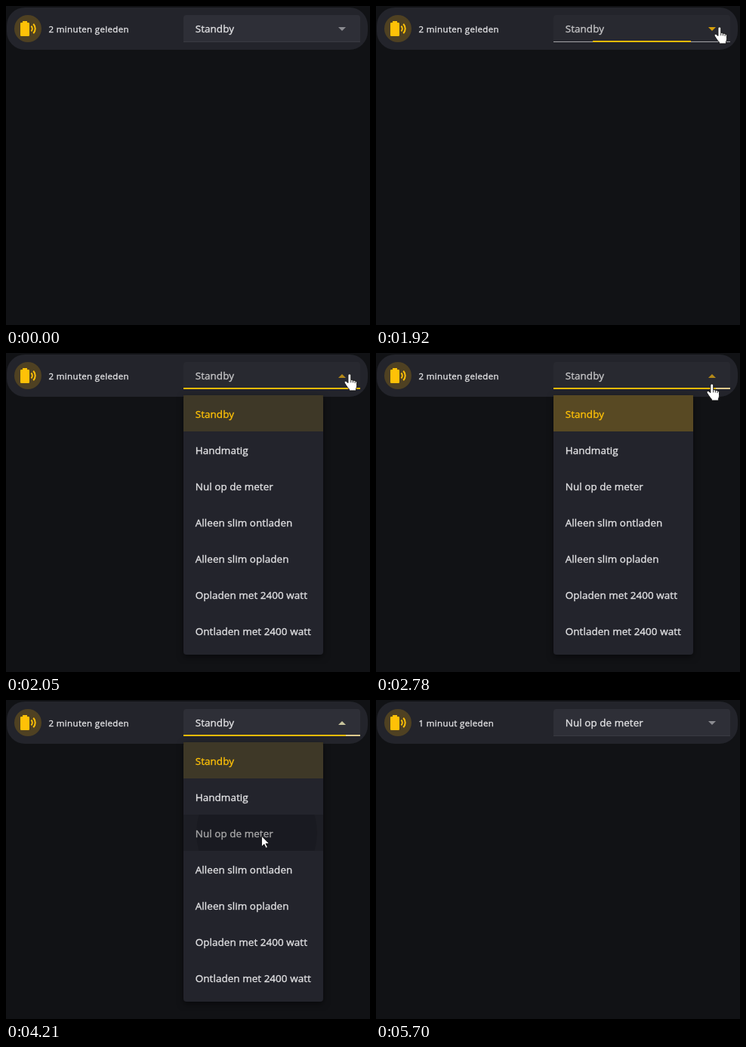
Recreate the animation shown at these times as an HTML page. Size 482 by 423 pixels, loop 9170 ms.

```html
<!DOCTYPE html>
<html lang="nl">
<head>
<meta charset="utf-8">
<title>Batterijmodus</title>
<style>
html, body { margin: 0; width: 100%; height: 100%; overflow: hidden; background: #111215; }
svg { display: block; }
text {
  font: 500 13.4px "Open Sans", "Noto Sans", sans-serif; letter-spacing: .08px;
  color: #e3e3e5; fill: currentColor; stroke: currentColor; stroke-width: .35;
}
#ago { font-size: 11.5px; letter-spacing: .35px; }
#items text:first-child { color: #ffc107; }
#panel { filter: drop-shadow(0 3px 4px rgba(0, 0, 0, .5)); }
#hand, #arrow { fill: #fff; stroke: #111; stroke-width: .8; }
</style>
</head>
<body>
<svg width="482" height="423" viewBox="0 0 482 423">
  <clipPath id="row"><rect x="235" y="152" width="185" height="48"/></clipPath>
  <rect x="1" y="2" width="478" height="56" rx="24" fill="#23242b"/>
  <circle cx="29" cy="30" r="18" fill="#4f4122"/>
  <path fill="#ffc107" d="M29.7 22H28v-2h-6v2h-1.7a1.3 1.3 0 0 0-1.3 1.3v15.4a1.3 1.3 0 0 0 1.3 1.3h9.4a1.3 1.3 0 0 0 1.3-1.3V23.3a1.3 1.3 0 0 0-1.3-1.3z"/>
  <path fill="none" stroke="#ffc107" stroke-width="2" d="M33.4 26.5a5.2 5.2 0 0 1 0 7M36.2 23.7a9.2 9.2 0 0 1 0 12.6"/>
  <text id="ago" x="56.5" y="35"></text>

  <path id="box" fill="#2e2f37" d="M235 48V16a4 4 0 0 1 4-4h226a4 4 0 0 1 4 4v32z"/>
  <text id="value" x="250.8" y="35"></text>
  <path id="caret"/>
  <path id="shade" fill="#000" d="M235 47V16a4 4 0 0 1 4-4h226a4 4 0 0 1 4 4v31z"/>
  <rect id="base" x="235" y="47" width="234" height="1"/>
  <rect id="line" y="46" height="2" fill="#fbbc08"/>
  <rect id="tail" x="450" y="46" width="19" height="2" fill="#e0cb8e"/>

  <g id="menu">
    <rect id="panel" x="235" y="56" width="185" height="344" rx="4" fill="#23242c"/>
    <rect id="chosen" x="235" y="56" width="185" height="48" fill="#ffc107"/>
    <g id="items"></g>
    <rect id="hover" x="235" width="185" height="48" fill="#000"/>
    <circle id="ripple" cx="332" cy="176" fill="#000" opacity=".12" clip-path="url(#row)"/>
  </g>

  <path id="hand" d="M5.5 2a1.7 1.7 0 0 1 3.4 0v5l5 1.2q2 .6 2 2.6v3.4q0 2-1 3.6v2.2h-8v-1.5q-2-2-3.5-4.5l-2-3q-.8-1.7.7-2.2 1.4-.3 3.4 2zM8.9 7v3.5M11.3 7.6v3M13.7 8.2v3"/>
  <path id="arrow" d="M0 0v13l3-3 2.2 4.6 2-1-2.2-4.3h4.2z"/>
</svg>
<script>
const LOOP = 9170;
// Screen updates: start, end, number of steps
const BURSTS = [[1320, 1390, 2], [1850, 2180, 6], [2710, 3410, 11], [4140, 4560, 7], [5490, 5700, 4]];
const MODES = ["Standby", "Handmatig", "Nul op de meter", "Alleen slim ontladen",
  "Alleen slim opladen", "Opladen met 2400 watt", "Ontladen met 2400 watt"];

const $ = id => document.getElementById(id);
const set = (id, attrs) => { for (const k in attrs) $(id).setAttribute(k, attrs[k]); };
const show = (id, on) => set(id, { visibility: on ? "visible" : "hidden" });
const ramp = (t, a, b) => Math.min(1, Math.max(0, (t - a) / (b - a)));
const ease = p => p * p * (3 - 2 * p);
const mix = (a, b, p) => a.map((v, i) => v + (b[i] - v) * p);

$("items").innerHTML = MODES.map((m, i) => `<text x="250.8" y="${86 + 48 * i}">${m}</text>`).join("");

function hold(t) {
  let held = 0;
  for (const [a, b, n] of BURSTS) {
    if (t < a) break;
    const step = (b - a) / (n - 1);
    held = t >= b ? b : a + Math.floor((t - a) / step + 1e-6) * step;
  }
  return held;
}

function pointer(t) {
  if (t < 1320 || t >= 5700) return null;
  if (t < 2640) return mix([472, 28], [455, 27.5], ramp(t, 1320, 1390));
  if (t < 4200) return mix([455, 27.5], [339.5, 177.5], ease(ramp(t, 2640, 3410)));
  return mix([338.5, 180.3], [452, 209], ramp(t, 5420, 5630));
}

function draw(t) {
  const open = t >= 1950 && t < 4340;
  const pos = pointer(t);
  const [x, y] = pos || [-99, -99];
  const onBox = x > 235 && x < 469 && y < 48;
  const onMenu = open && x < 420 && y > 56;
  const focused = t >= 1850 && t < 4340;

  $("ago").textContent = t < 4490 ? "2 minuten geleden" : "1 minuut geleden";
  $("value").textContent = MODES[t < 4280 ? 0 : 2];
  set("shade", { opacity: onBox ? .13 : 0 });
  set("base", { fill: onBox ? "#a4a4a8" : "#3a3b42" });
  set("caret", {
    d: open ? "M440 33h10l-5-5z" : "M440 28h10l-5 5z",
    fill: !focused ? "#8b8c91" : !open ? "#f5b60c" : onBox ? "#cf9d1c" : "#c8c49c"
  });

  const w = 234 * ease(ramp(t, 1850, 1973));
  set("line", { x: 352 - w / 2, width: w, opacity: 1 - ramp(t, 4300, 4480) });
  show("tail", t >= 2710 && t < 4340);

  const grow = .8 + .2 * ramp(t, 1920, 2045);
  show("menu", open);
  set("menu", {
    transform: `translate(235 56) scale(${grow}) translate(-235 -56)`,
    opacity: ramp(t, 1920, 2000) * (1 - ramp(t, 4230, 4330))
  });
  set("chosen", { opacity: .12 + (t < 4200 ? .12 * ramp(t, 2050, 2180) : 0) });
  set("hover", { y: 56 + 48 * Math.floor((y - 56) / 48), opacity: onMenu ? .16 : 0 });
  set("ripple", { r: t < 4140 ? 0 : 45 + (t - 4140) / 2 });

  const hand = pos && (onBox || onMenu && t < 4200);
  show("hand", hand);
  show("arrow", pos && !hand);
  set("hand", { transform: `translate(${x - 8.2} ${y}) scale(1.12)` });
  set("arrow", { transform: `translate(${x} ${y}) scale(1.1)` });
}

function tick() {
  draw(hold(performance.now() % LOOP));
  requestAnimationFrame(tick);
}
tick();
</script>
</body>
</html>
```
